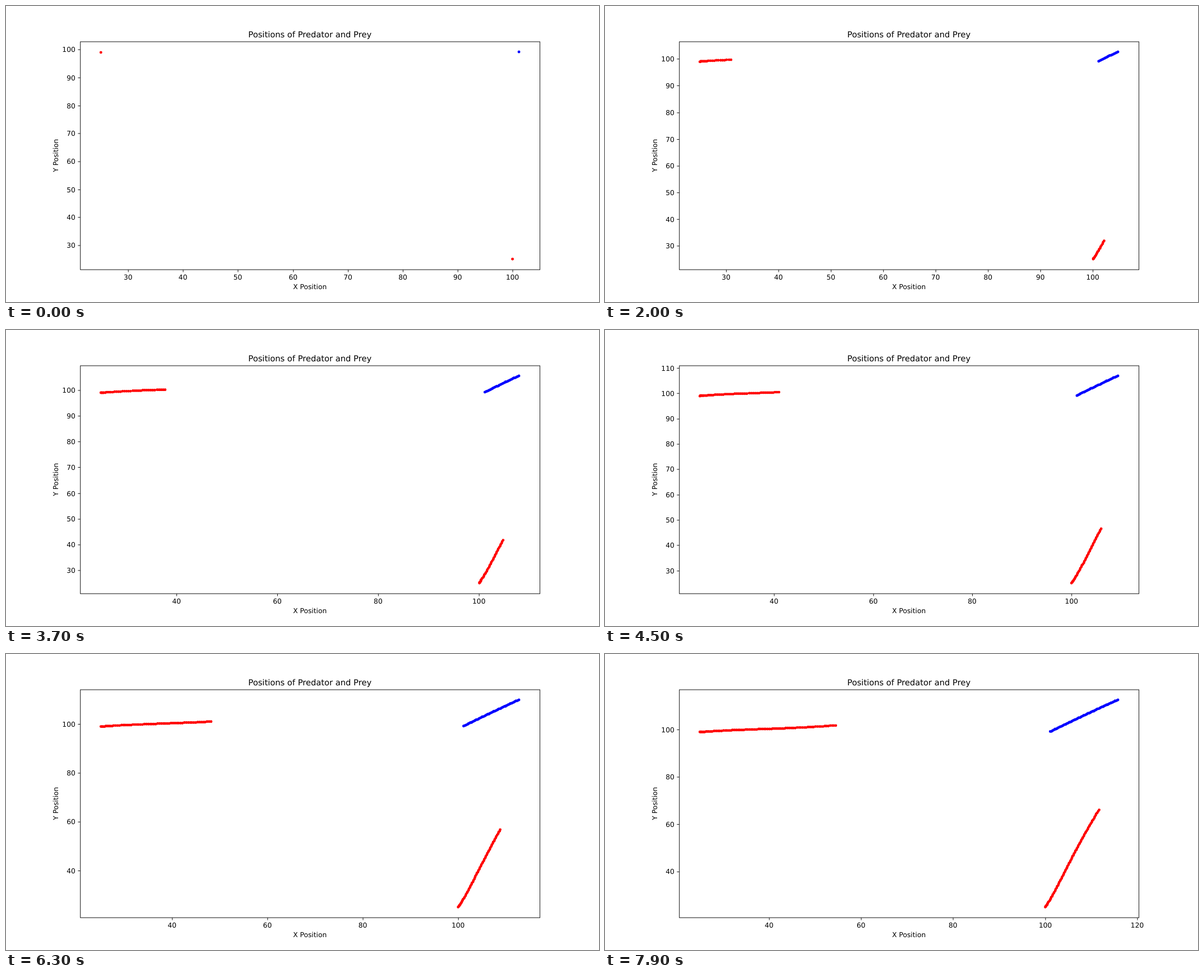
Animation, 1058 px wide and 529 px high, one loop 8 s. Source, as an HTML page:

```html
<!DOCTYPE html>
<html lang="en">
<head>
<meta charset="utf-8">
<title>Predator and prey</title>
<style>
  html, body { margin: 0; width: 100%; height: 100%; overflow: hidden; background: #fff; }
  svg { display: block; width: 100%; height: 100%; }
  text { font: 13.889px "DejaVu Sans", sans-serif; text-rendering: geometricPrecision; }
  .mid { text-anchor: middle; }
  .end { text-anchor: end; }
  .title { font-size: 16.667px; }
  .line { fill: none; stroke: #000; stroke-width: 1.05; }
  .dots { fill: none; stroke-width: 5.56; stroke-linecap: round; }
</style>
</head>
<body>
<svg viewBox="0 0 1200 600">
  <g id="trails"></g>
  <path id="ticks" class="line"/>
  <rect class="line" x="150.5" y="72.5" width="930" height="462"/>
  <g id="labels"></g>
  <text class="mid title" x="615" y="63.7">Positions of Predator and Prey</text>
  <text class="mid" x="615" y="573.6">X Position</text>
  <text class="mid" transform="translate(105 303) rotate(-90)">Y Position</text>
</svg>
<script>
const STEP = 100, COUNT = 80;
const BOX = { left: 150, right: 1080, top: 72, bottom: 534 };
const $ = id => document.getElementById(id);

function add(parent, tag, attrs) {
  const el = document.createElementNS("http://www.w3.org/2000/svg", tag);
  for (const k in attrs) el.setAttribute(k, attrs[k]);
  return parent.appendChild(el);
}

// Distance covered after n steps: constant acceleration up to a top speed.
function travelled(n, accel, top) {
  let d = 0;
  for (let i = 1; i <= n; i++) d += Math.min(top, accel * (i + 1));
  return d;
}

function prey(n) {
  return [101.16 + 0.18 * n + 6.7e-5 * n * n, 99.16 + 0.174 * n - 5e-5 * n * n];
}

function westHunter(n) {
  const u = travelled(n, 0.03, 0.4);
  return [25.05 + u, 99 + 0.1417 * u - 0.00538 * u * u + 0.000131 * u ** 3];
}

function southHunter(n) {
  const h = travelled(n, 0.0305, 0.578);
  return [100.05 + 0.25 * h + 0.48 * (1 - Math.exp(-h / 4)) + 1.33e-5 * h ** 3, 25.08 + h];
}

const series = [[westHunter, "#f00"], [southHunter, "#f00"], [prey, "#00f"]].map(([at, stroke]) => ({
  points: Array.from({ length: COUNT }, (_, n) => at(n)),
  path: add($("trails"), "path", { class: "dots", stroke })
}));

// Axis fitted to the data with a 5% margin, at most nine intervals.
function axis(values, from, to) {
  const min = Math.min(...values), max = Math.max(...values);
  const pad = (max - min) * 0.05, lo = min - pad, hi = max + pad;
  const gap = hi - lo > 90 ? 20 : 10;
  const ticks = [];
  for (let v = Math.ceil(lo / gap) * gap; v <= hi; v += gap) ticks.push(v);
  return { ticks, pos: v => Math.round(from + (v - lo) / (hi - lo) * (to - from)) };
}

function draw(n) {
  const shown = series.map(s => s.points.slice(0, n + 1));
  const all = shown.flat();
  const x = axis(all.map(p => p[0]), BOX.left, BOX.right);
  const y = axis(all.map(p => p[1]), BOX.bottom, BOX.top);

  series.forEach((s, i) => s.path.setAttribute("d",
    shown[i].map(p => `M${x.pos(p[0])} ${y.pos(p[1])}h0`).join("")));

  let d = "";
  $("labels").replaceChildren();
  for (const v of x.ticks) {
    d += `M${x.pos(v) + 0.5} 534.5v5`;
    add($("labels"), "text", { class: "mid", x: x.pos(v), y: 554.3 }).textContent = v;
  }
  for (const v of y.ticks) {
    d += `M150.5 ${y.pos(v) + 0.5}h-5`;
    add($("labels"), "text", { class: "end", x: 140.3, y: y.pos(v) + 5.3 }).textContent = v;
  }
  $("ticks").setAttribute("d", d);
}

let last = -1;
const start = performance.now();
function frame() {
  const n = Math.floor((performance.now() - start) / STEP) % COUNT;
  if (n !== last) draw(last = n);
  requestAnimationFrame(frame);
}
frame();
</script>
</body>
</html>
```
